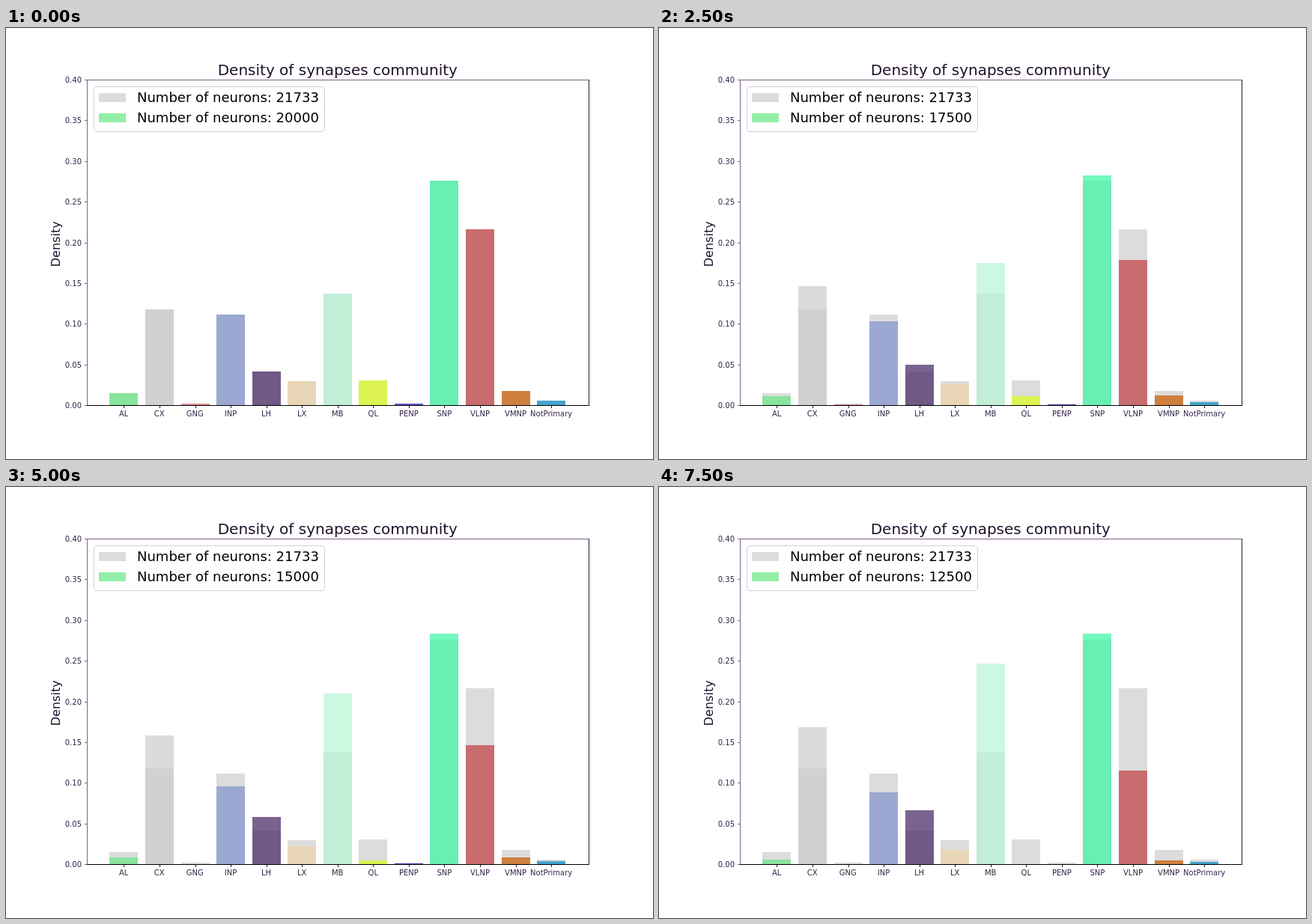
An HTML page for the animation above (8000 ms loop, 864x576 px).

```html
<!DOCTYPE html>
<html lang="en">
<head>
<meta charset="utf-8">
<title>Density of synapses community</title>
<style>
  html, body { margin: 0; width: 100%; height: 100%; overflow: hidden; background: #fff; }
  svg { display: block; width: 864px; height: 576px; font-family: "DejaVu Sans", sans-serif; }
  .tick { font-size: 10px; fill: #35244a; }
</style>
</head>
<body>
<svg id="chart" viewBox="0 0 864 576"></svg>
<script>
const STEP_MS = 500, STEPS = 16, FLOOR = 504, BAR_W = 38, ALPHA = 0.72;
const GREY = '#dcdcdc', INK = '#20122c', SPINE = '#80608c';

// Each bar's upper edge moves between two heights along a power curve.
const bars = [
  { name: 'AL', color: '#6ae886', from: 488, to: 498, power: 0.85 },
  { name: 'CX', color: '#cdcdcd', from: 376, to: 321, power: 0.57 },
  { name: 'GNG', color: '#e4717f', from: 502, to: 504, power: 0.35 },
  { name: 'INP', color: '#8396cf', from: 383, to: 408, power: 1 },
  { name: 'LH', color: '#472764', from: 459, to: 432, power: 1.15 },
  { name: 'LX', color: '#efd5aa', from: 472, to: 485, power: 1.25 },
  { name: 'MB', color: '#b9f6d6', from: 355, to: 236, power: 1.08 },
  { name: 'QL', color: '#ddfd1c', from: 471, to: 504, power: 0.45 },
  { name: 'PENP', color: '#2a1fc0', from: 502.4, to: 504, power: 1.3 },
  { name: 'SNP', color: '#3ef6a6', from: 204, to: 195.5, power: 0.13 },
  { name: 'VLNP', color: '#c34247', from: 269, to: 379, power: 1 },
  { name: 'VMNP', color: '#cb5e03', from: 485, to: 499, power: 0.8 },
  { name: 'NotPrimary', color: '#0a90c7', from: 498.2, to: 500.7, power: 0.35 }
];

const svg = document.getElementById('chart');

function add(tag, attrs, text) {
  const el = document.createElementNS('http://www.w3.org/2000/svg', tag);
  for (const key in attrs) el.setAttribute(key, attrs[key]);
  if (text !== undefined) el.textContent = text;
  svg.appendChild(el);
  return el;
}

const rect = (x, y, width, height, fill, more) => add('rect', { x, y, width, height, fill, ...more });

// The first move covers two steps' worth of change.
function topAt({ from, to, power }, step) {
  const progress = step ? (step + 1) / STEPS : 0;
  return Math.round(from + (to - from) * progress ** power);
}

bars.forEach((bar, i) => {
  const x = Math.round(138.4 + 47.56 * i), top = topAt(bar, 0);
  rect(x, top, BAR_W, FLOOR - top, GREY);
  bar.el = rect(x, top, BAR_W, FLOOR - top, bar.color, { 'fill-opacity': ALPHA });
  rect(x + 19, 505, 1, 3, INK);
  add('text', { x: 157.2 + 47.58 * i, y: 519, class: 'tick', 'text-anchor': 'middle' }, bar.name);
});

for (let i = 0; i <= 8; i++) {
  const y = FLOOR - i * 54.36;
  rect(105, Math.round(y), 3, 1, SPINE);
  add('text', { x: 101, y: y + 4, class: 'tick', 'text-anchor': 'end' }, (i * 0.05).toFixed(2));
}

// Axes frame
rect(108, 69, 671, 1, SPINE);
rect(108, 69, 1, 436, SPINE);
rect(778, 69, 1, 436, '#222');
rect(108, FLOOR, 671, 1, '#000');

add('text', { x: 442.8, y: 63, 'font-size': 20, fill: INK, 'text-anchor': 'middle' }, 'Density of synapses community');
add('text', { transform: 'translate(72 288.8) rotate(-90)', 'font-size': 16, fill: INK, 'text-anchor': 'middle' }, 'Density');

// Legend
rect(117.5, 78.5, 308, 60, '#fff', { rx: 3.5, stroke: '#d2d2d2' });
rect(124, 87, 36, 12, GREY);
rect(124, 114, 36, 12, bars[0].color, { 'fill-opacity': ALPHA });
const neurons = count => 'Number of neurons: ' + count;
add('text', { x: 175, y: 99, 'font-size': 18 }, neurons(21733));
const counter = add('text', { x: 175, y: 126, 'font-size': 18 }, neurons(20000));

function draw(step) {
  counter.textContent = neurons(20000 - 500 * step);
  for (const bar of bars) {
    const top = topAt(bar, step);
    bar.el.setAttribute('y', top);
    bar.el.setAttribute('height', FLOOR - top);
  }
}

const start = performance.now();
function tick() {
  draw(Math.floor((performance.now() - start) / STEP_MS) % STEPS);
  requestAnimationFrame(tick);
}
tick();
</script>
</body>
</html>
```
